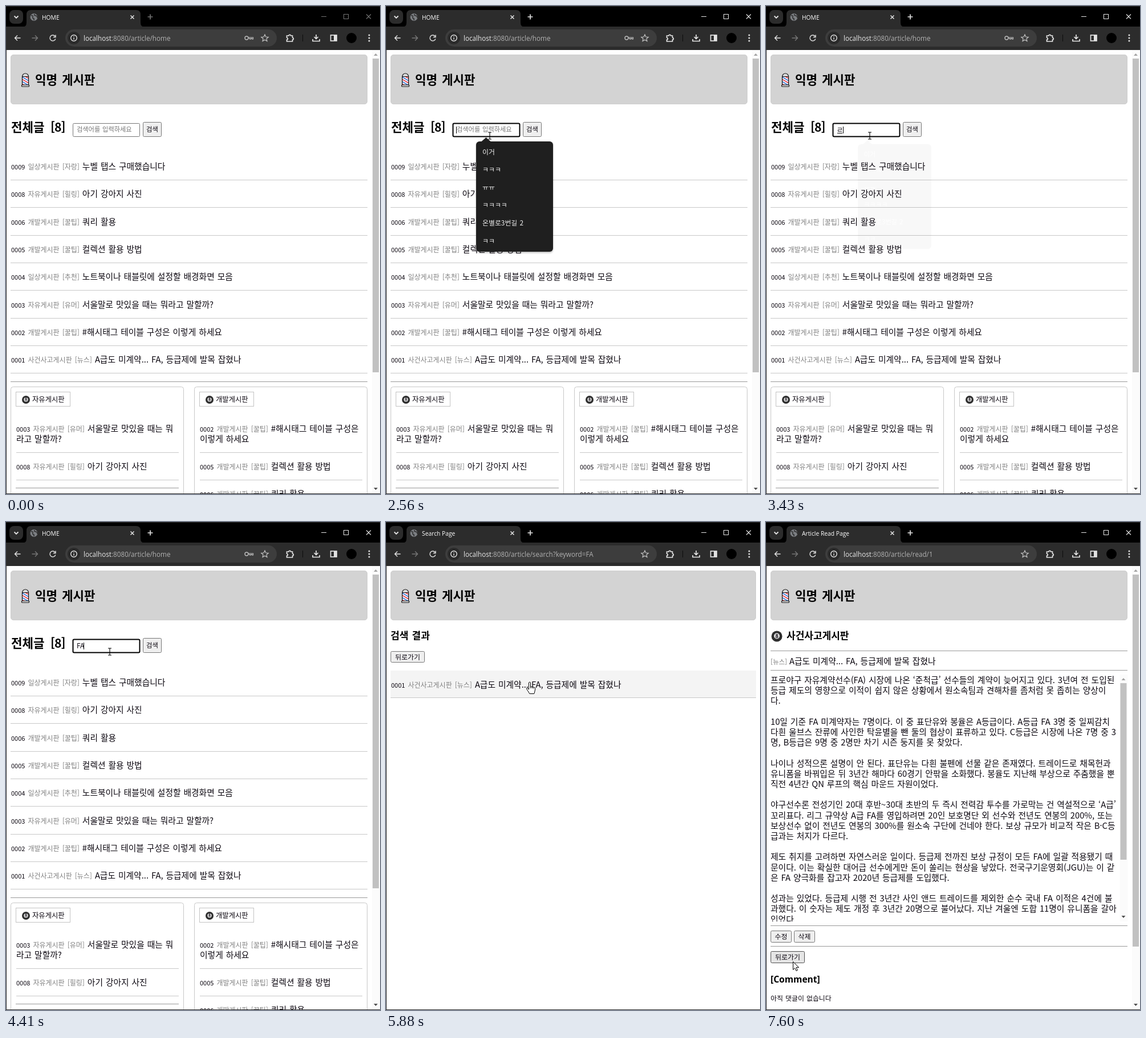
Write an HTML page that moves like this. It is 656 by 854 pixels and loops after 8000 ms.

```html
<!DOCTYPE html>
<html lang="ko">
<head>
<meta charset="utf-8">
<title>Board</title>
<style>
html, body { margin: 0; width: 100%; height: 100%; overflow: hidden; background: #fff; }
svg { display: block; width: 656px; height: 854px; }
text { font-family: "Noto Sans CJK KR", "Noto Sans CJK JP", "Noto Sans CJK", sans-serif; font-size: 14.75px; font-weight: 350; word-spacing: .8px; fill: #0c0710; white-space: pre; }
.ui { font-family: "Open Sans", "Noto Sans", sans-serif; font-weight: 400; word-spacing: 0; fill: #e8e8e8; }
.s { font-size: 11.9px; }
.g { fill: #808080; font-size: 12px; }
.n { font-size: 11px; }
.h1 { font-size: 21.2px; font-weight: 700; word-spacing: 2px; fill: #000; }
.h2 { font-size: 17px; font-weight: 700; word-spacing: 1.5px; fill: #000; }
.btn { fill: #efefef; stroke: #767676; }
.btn.on { fill: #e5e5e5; stroke: #4f4f4f; }
.tabbtn { fill: #fff; stroke: #c4c4c4; }
.tabbtn.on { fill: #efefef; }
.row { fill: #fff; }
.row.on { fill: #f4f4f4; }
.line { fill: none; stroke: #e3e3e3; stroke-width: 1.4; }
</style>
</head>
<body>
<svg id="stage" viewBox="0 0 656 854"></svg>
<script>
const text = (x, y, str, cls = '', more = '') => `<text x="${x}" y="${y}" class="${cls}" ${more}>${str}</text>`;
const rect = (x, y, w, h, fill, more = '') => `<rect x="${x}" y="${y}" width="${w}" height="${h}" fill="${fill}" ${more}/>`;
const path = (d, more = 'class="line"') => `<path d="${d}" ${more}/>`;
const group = (id, body) => `<g id="${id}">${body}</g>`;
const box = (cls, x, y, w, h, id = '', r = 2) =>
  `<rect class="${cls}" id="${id}" x="${x + .5}" y="${y + .5}" width="${w - 1}" height="${h - 1}" rx="${r}"/>`;
const rule = (y, x = 8, w = 626, fill = '#999') => rect(x, y, w, 1, fill);
const thin = (y, x, w) => rule(y, x, w, '#c8c8c8');
const button = (x, y, w, h, label, id) => box('btn', x, y, w, h, id) +
  text(x + w / 2, y + h / 2 + 4.5, label, 's', 'text-anchor="middle"');
const post = (x, y, num, cat, tag, title) =>
  `<text x="${x}" y="${y}"><tspan class="n">${num}</tspan><tspan class="g" dx="5">${cat}</tspan>` +
  `<tspan class="g" dx="5">[${tag}]</tspan><tspan dx="5">${title}</tspan></text>`;

const eightBall = (x, y, r) => `<circle cx="${x}" cy="${y}" r="${r}" fill="#2f2f2f"/>` +
  `<circle cx="${x}" cy="${y - r * .05}" r="${r * .52}" fill="#e8e8e8"/>` +
  `<text x="${x}" y="${y + r * .3}" text-anchor="middle" style="font-size:${r}px;font-weight:700">8</text>`;

const barberPole =
  '<clipPath id="pole"><rect x="29" y="124" width="10" height="14"/></clipPath>' +
  path('M28.500 139v-15.500a5.500 5.500 0 0 1 11 0v15.500z', 'fill="#fff"') +
  path('M28.500 123.500a5.500 5.500 0 0 1 11 0z', 'fill="#dcdcdc"') + '<g clip-path="url(#pole)">' +
  [0, 1, 2, 3, 4].map(i => path(`M28 ${120 + i * 4}l12 7`, `stroke="${i % 2 ? '#2f6fd0' : '#e0343f'}" stroke-width="1.6"`)).join('') + '</g>' +
  path('M28.500 138v-14.500a5.500 5.500 0 0 1 11 0v14.500M28.500 123.500h11', 'fill="none" stroke="#111" stroke-width="1.2"') +
  '<rect x="27.500" y="138" width="13" height="3" rx="1" fill="#dcdcdc" stroke="#111" stroke-width="1.2"/>';

const header = w => `<rect x="8.5" y="85.5" width="${w - 1}" height="86" rx="4.5" fill="#d3d3d3" stroke="#ccc"/>` +
  barberPole + text(51, 137, '익명 게시판', 'h1');
const scrollbar = (x, top, bottom, thumb, end) =>
  rect(x - 1, top, 14, bottom - top, '#fbfbfb') + rect(x, thumb, 11, end - thumb, '#c1c1c1') +
  path(`M${x + 2} ${top + 10}h7l-3.5-4z`, 'fill="#a3a3a3"') +
  path(`M${x + 2} ${bottom - 10}h7l-3.5 4z`, 'fill="#505050"');

const posts = [
  ['0009', '일상게시판', '자랑', '누벨 탭스 구매했습니다'],
  ['0008', '자유게시판', '힐링', '아기 강아지 사진'],
  ['0006', '개발게시판', '꿀팁', '쿼리 활용'],
  ['0005', '개발게시판', '꿀팁', '컬렉션 활용 방법'],
  ['0004', '일상게시판', '추천', '노트북이나 태블릿에 설정할 배경화면 모음'],
  ['0003', '자유게시판', '유머', '서울말로 맛있을 때는 뭐라고 말할까?'],
  ['0002', '개발게시판', '꿀팁', '#해시태그 테이블 구성은 이렇게 하세요'],
  ['0001', '사건사고게시판', '뉴스', 'A급도 미계약... FA, 등급제에 발목 잡혔나']
];
const PITCH = 48.35;

const board = (x, name, id, first, wrapped, second) =>
  `<rect x="${x + .5}" y="666.5" width="303" height="210" rx="4" fill="#fff" stroke="#c8c8c8"/>` +
  box('tabbtn', x + 9, 675, 96, 26, id, 0) + eightBall(x + 27, 689, 7) +
  text(x + 38, 693, name, '', 'style="font-size:12.3px"') +
  post(x + 10, 745, ...first) + text(x + 10, 763, wrapped) + thin(781, x + 10, 285) +
  post(x + 10, 811, ...second) + thin(829, x + 10, 285);

const home = header(626) + text(9, 220, '전체글<tspan x="78" letter-spacing="-1">[8]</tspan>', 'h1') +
  '<rect id="field" x="117.5" y="205.5" width="117" height="23" rx="2" fill="#fff"/>' +
  text(124, 220, '검색어를 입력하세요', '', 'id="hint" style="font-size:11.2px;fill:#757575"') +
  text(124, 220.5, '', 's', 'id="typed"') + rect(125, 222, 9, 1, '#000', 'id="underline"') +
  rect(124, 211, 1, 12, '#000', 'id="caret"') +
  box('btn', 240, 203, 33, 26) + text(256.5, 220, '검색', '', 'text-anchor="middle" style="font-size:11.3px"') +
  posts.map((p, i) => {
    const y = Math.round(256 + i * PITCH);
    return `<rect class="row" id="row${i}" x="8" y="${y + 1}" width="626" height="47"/>` + post(9, y + 30, ...p) + thin(y + 48, 8, 626);
  }).join('') + rule(657) +
  board(8, '자유게시판', 'free', [...posts[5].slice(0, 3), '서울말로 맛있을 때는 뭐'], '라고 말할까?', posts[1]) +
  rule(843, 17, 286) +
  board(330, '개발게시판', 'dev', [...posts[6].slice(0, 3), '#해시태그 테이블 구성은'], '이렇게 하세요', posts[3]) +
  post(340, 859, ...posts[2]) + scrollbar(643, 77, 853, 92, 641);

const results = header(641) + text(8, 205, '검색 결과', 'h2') + button(8, 226, 60, 20, '뒤로가기', '') +
  '<rect class="row" id="hit" x="8" y="260" width="641" height="48"/>' + post(9, 290, ...posts[7]) + thin(307, 8, 641);

const article = `프로야구 자유계약선수(FA) 시장에 나온 ‘준척급’ 선수들의 계약이 늦어지고 있다. 3년여 전 도입된
등급 제도의 영향으로 이적이 쉽지 않은 상황에서 원소속팀과 견해차를 좀처럼 못 좁히는 양상이
다.

10일 기준 FA 미계약자는 7명이다. 이 중 표단유와 봉율은 A등급이다. A등급 FA 3명 중 일찌감치
다흰 울브스 잔류에 사인한 탁윤별을 뺀 둘의 협상이 표류하고 있다. C등급은 시장에 나온 7명 중 3
명, B등급은 9명 중 2명만 차기 시즌 둥지를 못 찾았다.

나이나 성적으론 설명이 안 된다. 표단유는 다흰 불펜에 선물 같은 존재였다. 트레이드로 채목헌과
유니폼을 바꿔입은 뒤 3년간 해마다 60경기 안팎을 소화했다. 봉율도 지난해 부상으로 주춤했을 뿐
직전 4년간 QN 루프의 핵심 마운드 자원이었다.

야구선수론 전성기인 20대 후반~30대 초반의 두 즉시 전력감 투수를 가로막는 건 역설적으로 ‘A급’
꼬리표다. 리그 규약상 A급 FA를 영입하려면 20인 보호명단 외 선수와 전년도 연봉의 200%, 또는
보상선수 없이 전년도 연봉의 300%를 원소속 구단에 건네야 한다. 보상 규모가 비교적 작은 B·C등
급과는 처지가 다르다.

제도 취지를 고려하면 자연스러운 일이다. 등급제 전까진 보상 규정이 모든 FA에 일괄 적용됐기 때
문이다. 이는 확실한 대어급 선수에게만 돈이 쏠리는 현상을 낳았다. 전국구기운영회(JGU)는 이 같
은 FA 양극화를 잡고자 2020년 등급제를 도입했다.

성과는 있었다. 등급제 시행 전 3년간 사인 앤드 트레이드를 제외한 순수 국내 FA 이적은 4건에 불
과했다. 이 숫자는 제도 개정 후 3년간 20명으로 불어났다. 지난 겨울엔 도합 11명이 유니폼을 갈아
입었다.`;

const read = header(626) + eightBall(19, 200, 9.5) + text(36, 204.5, '사건사고게시판', 'h2') + rule(225) +
  '<text x="8" y="249"><tspan class="g" style="font-size:11.5px">[뉴스]</tspan><tspan x="41">' + posts[7][3] + '</tspan></text>' + rule(259) +
  '<clipPath id="body"><rect x="8" y="262" width="626" height="437"/></clipPath><g clip-path="url(#body)">' +
  article.split('\n').map((s, i) => text(8, 282 + i * 18.2, s)).join('') + '</g>' +
  scrollbar(621.5, 267, 699, 282, 591) + rule(706) +
  button(8, 715, 37, 21, '수정', '') + button(49, 715, 37, 21, '삭제', '') + rule(742) +
  button(8, 751, 60, 21, '뒤로가기', 'back') +
  text(8, 806, '[Comment]', 'ui', 'style="font-size:15.6px;font-weight:700;fill:#000"') +
  text(8, 838, '아직 댓글이 없습니다', 's') + scrollbar(643, 77, 853, 92, 743);

const suggestions = ['이거', 'ㅋㅋㅋ', 'ㅠㅠ', 'ㅋㅋㅋㅋ', '온별로3번길 2', 'ㅋㅋ'];
const popup = rect(158, 238, 135, 194, '#000', 'rx="6" opacity=".25" style="filter:blur(1.5px)"') +
  path('M167 237.5l8.5-7.5 8.5 7.5z', 'fill="#1f1f1f"') + rect(158, 237, 135, 193, '#1f1f1f', 'rx="6"') +
  suggestions.map((s, i) => text(169, 260 + i * 31.1, s, 's', 'style="fill:#eee"')).join('');

const chrome = rect(0, 0, 656, 77, '#000') + rect(0, 0, 656, 1, '#2b2b2b') +
  rect(6, 7, 24, 24, '#2c2c2c', 'rx="8"') + path('M14.5 17.5l3.5 3.5 3.5-3.5', 'class="line" style="stroke-width:1.8"') +
  path('M28 37q8 0 8-8V15q0-8 8-8h184q8 0 8 8v14q0 8 8 8z', 'fill="#2c2c2c"') +
  '<circle cx="49" cy="19.5" r="6.5" fill="#7b7e82"/>' +
  path('M44 17q4-1 3 2t2 3v3M50 14q-1 3 2 3t3 4', 'fill="none" stroke="#2c2c2c" stroke-width="1.5"') +
  text(63, 24, '', 'ui', 'id="tab" style="font-size:10.3px;fill:#fff"') + path('M218.5 16.5l6 6m0-6l-6 6', 'class="line" style="stroke-width:1.5"') +
  group('controls', path('M253 14.5v9M248.5 19h9', 'class="line" style="stroke-width:1.7"') +
    path('M553 18.5h9M592.5 14.5h8v8h-8zM632 14.5l8 8m0-8l-8 8', 'class="line" style="stroke-width:1.1"')) +
  rect(0, 36, 656, 41, '#2c2c2c') +
  path('M25.5 56h-10m4.5-4.5l-4.5 4.5 4.5 4.5') +
  path('M45.5 56h10m-4.5-4.5l4.5 4.5-4.5 4.5', 'class="line" style="stroke:#777"') +
  path('M86 53a5 5 0 1 0 .8 4.5M87 50.5v4h-4') +
  rect(104, 41, 371, 30, '#3d3d3d', 'rx="15"') + '<circle cx="119" cy="56" r="11" fill="#2a2a2a"/>' +
  '<circle class="line" cx="119" cy="56" r="5.3"/>' + path('M119 55.5v3.2M119 53v1.2') +
  '<text class="ui" x="136" y="60.5" style="font-size:11.7px">localhost<tspan id="url" fill="#b0b0b0"></tspan></text>' +
  group('key', '<circle class="line" cx="422" cy="56" r="3" style="stroke:#bbb"/>' +
    path('M425 55h8.5v3h-2v-1.5h-2v1.5h-2v-1.5h-2', 'class="line" style="stroke:#bbb;stroke-width:1.2"')) +
  path('M454 50l1.8 4 4.4.4-3.3 2.9 1 4.3-3.9-2.3-3.9 2.3 1-4.3-3.3-2.9 4.4-.4z', 'class="line" style="stroke:#c4c4c4;stroke-width:1.2"') +
  path('M492.5 52h3.5a1.7 1.7 0 0 1 3.5 0h3v3.5a1.7 1.7 0 0 1 0 3.5v3h-10v-3a1.7 1.7 0 0 0 0-3.5z', 'class="line" style="stroke-width:1.7"') +
  rect(520, 50, 1, 12, '#0d0d0d') +
  path('M544 50v7.5m-3.5-3.5l3.5 3.5 3.5-3.5M538 58v3.5h12v-3.5', 'class="line" style="stroke-width:1.7"') +
  '<rect x="569.5" y="51" width="10.5" height="10" class="line" style="stroke-width:1.7"/>' + rect(575, 51, 5, 10, '#e3e3e3') +
  '<circle cx="606" cy="56" r="9" fill="#000"/>' +
  [51, 56, 61].map(y => `<circle cx="637" cy="${y}" r="1.5" fill="#e3e3e3"/>`).join('');

const ink = 'fill="#fff" stroke="#000" stroke-width="1" stroke-linejoin="round"';
const cursors = {
  arrow: path('M.5.5v14l3.2-3 2.3 5 2.3-1-2.2-5h4.4z', ink),
  hand: path('M-1.5 1q1.5-2 3 0v7l7 1.5q1.5.5 1.3 2.5l-1 5-1 3.5h-8l-2-3.5-3-4.5q-1-2 1-2l2.7 2.5z', ink) +
    path('M1.5 8v3M4.3 8.8v2.6M7 9.5v2.3', 'stroke="#000" stroke-width=".9"'),
  beam: path('M-3-6h2.5l.5.5.5-.5h2.5M0-5.5v11M-3 6h2.5l.5-.5.5.5h2.5', 'fill="none" stroke="#000" stroke-width="1.1"')
};

const stage = document.getElementById('stage');
stage.innerHTML = rect(0, 0, 656, 854, '#fff') + group('home', home) + group('results', results) + group('read', read) +
  group('popup', popup) + chrome + rect(0, 77, 1, 777, '#2b2b2b') + rect(0, 853, 656, 1, '#2b2b2b') +
  group('cursor', Object.keys(cursors).map(k => group(k, cursors[k])).join(''));

const el = {};
stage.querySelectorAll('[id]').forEach(e => { if (e.id) el[e.id] = e; });
const show = (id, on) => { el[id].style.display = on ? '' : 'none'; };
const hover = (id, on) => el[id].classList.toggle('on', on);

// Pointer moves: start, end, number of steps, waypoints
const moves = [
  [290, 780, 6, [[496, 786], [410, 688], [330, 560], [250, 400], [200, 280], [186, 220]]],
  [1070, 1270, 3, [[186, 221], [182, 227]]],
  [5580, 5880, 4, [[190, 210], [215, 240], [252, 280]]],
  [6250, 6450, 3, [[252, 281], [240, 365], [224, 444]]],
  [6640, 7410, 9, [[222, 460], [120, 640], [58, 773]]],
  [7500, 7600, 2, [[50, 771], [47, 769]]]
];

function pointerAt(t) {
  const move = moves.filter(m => t >= m[0]).pop();
  if (!move) return null;
  const [from, to, steps, pts] = move;
  const k = Math.min(steps - 1, Math.floor((t - from) / (to - from) * (steps - 1) + .001));
  const u = k / (steps - 1) * (pts.length - 1);
  const i = Math.min(pts.length - 2, Math.floor(u));
  return pts[i].map((v, j) => Math.round(v + (pts[i + 1][j] - v) * (u - i)));
}

const pages = {
  home: ['HOME', ':8080/article/home'],
  results: ['Search Page', ':8080/article/search?keyword=FA'],
  read: ['Article Read Page', ':8080/article/read/1']
};

function drawField(t) {
  const focus = t >= 2560;
  const value = t >= 4410 ? 'FA' : t >= 4310 ? 'F' : t >= 3250 && t < 3830 ? 'ㄹ' : '';
  el.field.setAttribute('stroke', focus ? '#000' : t >= 780 ? '#333' : '#767676');
  el.field.setAttribute('stroke-width', focus ? 2 : 1);
  el.typed.textContent = value;
  show('hint', !value);
  show('underline', value === 'ㄹ');
  show('caret', focus && !(t >= 3050 && t < 3250));
  el.caret.setAttribute('x', { '': 123, 'ㄹ': 135, F: 130, FA: 136 }[value]);

  const fade = t < 3250 ? 0 : Math.min(3, Math.floor((t - 3250) / 90) + 1);
  const size = 1 - fade * .016;
  show('popup', focus && t < 3530);
  el.popup.setAttribute('opacity', [1, .7, .3, .025][fade]);
  el.popup.setAttribute('transform', `translate(225.5 333.5) scale(${size}) translate(-225.5 -333.5)`);
}

function draw(t) {
  const page = t < 4800 ? 'home' : t < 6250 ? 'results' : 'read';
  Object.keys(pages).forEach(p => show(p, p === page));
  el.tab.textContent = pages[page][0];
  el.url.textContent = pages[page][1];
  show('key', page === 'home');
  el.controls.setAttribute('opacity', t < 2560 ? .5 : 1);
  drawField(page === 'home' ? t : 0);

  const p = pointerAt(t);
  const [x, y] = p || [-99, -99];
  const row = page === 'home' && y > 256 && y < 642 ? Math.floor((y - 256) / PITCH) : -1;
  const onHit = page === 'results' && y >= 260 && y < 308;
  const onBack = page === 'read' && x < 68 && y >= 751 && y < 772;
  posts.forEach((_, i) => hover('row' + i, i === row));
  hover('hit', onHit);
  hover('back', onBack);
  hover('dev', t >= 388 && t < 2560);

  const onField = page === 'home' && x < 235 && y >= 205 && y < 229;
  const onText = page === 'read' && t >= 6350 && y > 262 && y < 699;
  const onTab = page === 'home' && x > 339 && x < 435 && y > 675 && y < 701;
  const kind = row >= 0 || onHit || onTab ? 'hand' : onField || onText ? 'beam' : 'arrow';
  Object.keys(cursors).forEach(k => show(k, k === kind));
  show('cursor', !!p);
  el.cursor.setAttribute('transform', `translate(${x} ${y})`);
}

const start = performance.now();
function tick() {
  draw((performance.now() - start) % 8000);
  requestAnimationFrame(tick);
}
tick();
</script>
</body>
</html>
```
